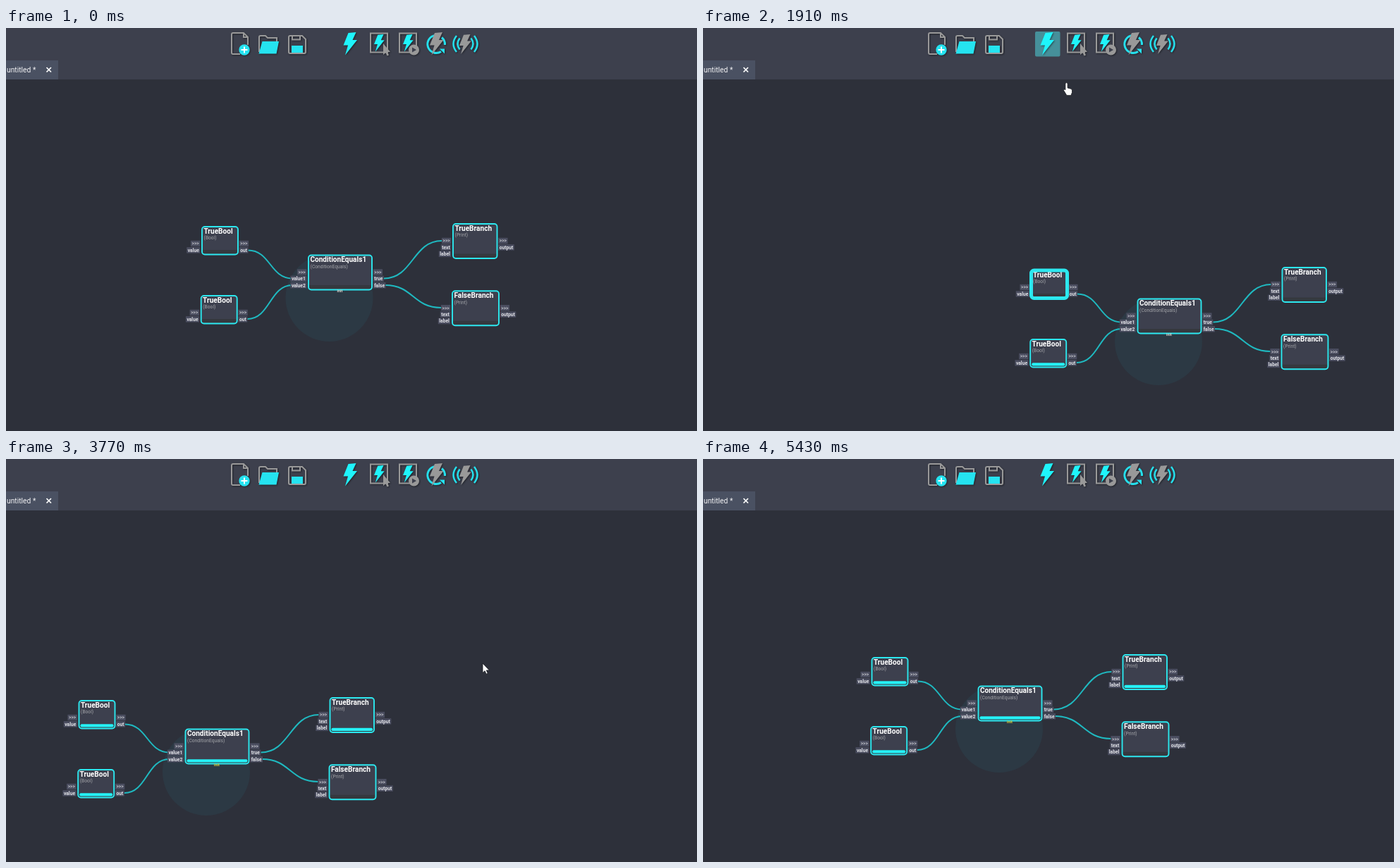
Animation of 980 by 572 pixels, one loop 6090 ms. Source, as an HTML page:

```html
<!DOCTYPE html>
<html lang="en">
<head>
<meta charset="utf-8">
<title>Node graph run</title>
<style>
html, body { margin: 0; width: 100%; height: 100%; overflow: hidden; background: #2d303a; }
svg { display: block; width: 100vw; height: 100vh; font-family: Roboto, sans-serif; }
.icons { filter: drop-shadow(1px 1px 1px #0007); fill: none; stroke-width: 2; }
.grey { stroke: #999; }
.cyan { stroke: #25dfec; }
.grey-fill { fill: #999; }
.cyan-fill { fill: #25e3f0; }
.title { font-weight: 700; font-size: 10.1px; fill: #fff; }
.type { font-size: 6.7px; fill: #a2a3a8; }
.port { font-weight: 700; font-size: 6.7px; fill: #e2e3e8; }
.wire { fill: none; stroke: #1fb9c0; stroke-width: 2; }
</style>
</head>
<body>
<svg viewBox="0 0 980 572">
  <g id="graph">
    <circle cx="458.5" cy="383" r="62" fill="#2c3944"/>
  </g>

  <rect width="980" height="73" fill="#3d404d"/>
  <rect y="46" width="74" height="27" fill="#4a5162"/>
  <text x="1" y="63" font-size="10.3" fill="#f2f2f4">untitled *</text>
  <path d="M57.5 56l6.5 6.5m0-6.5l-6.5 6.5" stroke="#fff" stroke-width="1.7"/>
  <rect id="highlight" x="471" y="5" width="35.5" height="35.5" rx="2" fill="#46909a"/>

  <defs>
    <path id="bolt" stroke="none" d="M7 1L18 0L13 11H19.500L2.500 32.500L6.500 18.500H0Z"/>
  </defs>
  <g class="icons">
    <path class="grey" d="M332 37H322q-2 0-2-2V9q0-2 2-2h15l6 6v11M337 7v6h6"/>
    <circle class="cyan-fill" cx="338" cy="31" r="7.7"/>
    <path d="M333.5 31h9m-4.500-4.500v9" stroke="#fff"/>

    <path class="grey" d="M359 34V13q0-2 2-2h7l3 3h13v5"/>
    <path class="cyan-fill" d="M363.500 19H387L383.500 36.500H358.500Z"/>

    <path class="grey" d="M403 11h17l5 5v18q0 2-2 2h-20q-2 0-2-2v-21q0-2 2-2z"/>
    <path class="grey" d="M406 11v5.500h11V11"/>
    <path class="cyan-fill" d="M405 25h16v10h-16z"/>

    <use href="#bolt" x="478.500" y="6" fill="#1ff4fb"/>

    <path class="grey" d="M517 7.500h24v27h-24z"/>
    <use href="#bolt" transform="translate(522 9) scale(.75)" fill="#1ff4fb"/>
    <path class="grey-fill" d="M535 22v16l3.500-3 2 4.500 2.500-1-2-4.500h4z"/>

    <path class="grey" d="M558 7.500h24v27h-24z"/>
    <use href="#bolt" transform="translate(563 9) scale(.75)" fill="#1ff4fb"/>
    <circle class="grey-fill" cx="578.500" cy="31" r="7.500"/>
    <path d="M576 27.500l6 3.500-6 3.500z" fill="#3d404d"/>

    <path class="cyan" stroke-width="3" d="M617 33.500A12.500 12.500 0 1 1 609 10.500M618 13.500A12.500 12.500 0 0 1 622.500 24"/>
    <path class="cyan-fill" d="M615 29.500h7v7z"/>
    <use href="#bolt" x="601" y="6" fill="#999"/>

    <use href="#bolt" transform="translate(643 9) scale(.86)" fill="#999"/>
    <path class="cyan" stroke-width="2.500" d="M643.500 14.500q-6 8 0 16M639 11q-9 11.500 0 23M659.500 14.500q6 8 0 16M664 11q9 11.500 0 23"/>
  </g>

  <g id="cursor">
    <circle id="press" r="12" fill="#a19a2b"/>
    <path id="arrow" fill="#fff" stroke="#15171c" stroke-width=".8" d="M0 0v13.500l3.100-2.800 2 4.500 2.200-1-2-4.300h4.200z"/>
    <path id="pointer" fill="#fff" stroke="#15171c" stroke-width=".8" d="M-1.600 1.200a1.600 1.600 0 0 1 3.200 0v5.800l4.600 1.300q1.800.5 1.800 2.400v2.700l-1.600 4.300h-6l-4.400-7.200q0-2 1.600-1.500l.8.8z"/>
    <g id="grab" fill="none" stroke="#fffbd0" stroke-linecap="round" stroke-width="1.800">
      <path d="M-2.500 2v-5M0 2v-6M2.400 2v-5M4.600 3v-4M-5 1.500l3 3"/>
      <path fill="#fffbd0" d="M-2.500 2h7v2l-1.500 3h-3z"/>
    </g>
  </g>
</svg>
<script>
const LOOP = 6090, STEP = 66.35, FIRST_STEP = 112;
const graph = document.getElementById('graph');

function add(parent, tag, attrs, text) {
  const el = document.createElementNS('http://www.w3.org/2000/svg', tag);
  for (const key in attrs) el.setAttribute(key, attrs[key]);
  if (text) el.textContent = text;
  parent.append(el);
  return el;
}

const wires = [
  [343.5, 315.5, 406, 355.5], [342.5, 413, 406, 365],
  [536, 355.5, 618, 302], [538, 365, 617, 397]
];
for (const [x1, y1, x2, y2] of wires) {
  const mid = (x1 + x2) / 2;
  add(graph, 'path', { class: 'wire', d: `M${x1} ${y1}C${mid} ${y1} ${mid} ${y2} ${x2} ${y2}` });
}

// start and done are the steps at which a node begins and finishes running
const nodes = [
  { title: 'TrueBool', type: 'Bool', box: [277, 281, 53, 41.5], ins: ['value'], outs: ['out'], start: 24, done: 32 },
  { title: 'TrueBool', type: 'Bool', box: [275.7, 379, 53, 41.5], ins: ['value'], outs: ['out'], start: 17, done: 24 },
  { title: 'ConditionEquals1', type: 'ConditionEquals', box: [428, 321.5, 92, 51], ins: ['value1', 'value2'], outs: ['true', 'false'], start: 32, done: 41 },
  { title: 'TrueBranch', type: 'Print', box: [633, 277, 64.5, 51], ins: ['text', 'label'], outs: ['output'], start: 41, done: 44 },
  { title: 'FalseBranch', type: 'Print', box: [632, 372.2, 68, 51], ins: ['text', 'label'], outs: ['output'], start: Infinity, done: Infinity }
];

function addPort(name, x, y, anchor) {
  const back = add(graph, 'rect', { y: y - 4.2, height: 8.4, fill: '#4a4d5f' });
  const label = add(graph, 'text', { class: 'port', x, y: y + 2.3, 'text-anchor': anchor }, name);
  if (name === '>>>') label.style.fill = '#b9bac2';
  const width = label.getComputedTextLength();
  back.setAttribute('x', (anchor === 'end' ? x - width : x) - 1.5);
  back.setAttribute('width', width + 3);
}

for (const node of nodes) {
  const [x, y, w, h] = node.box;
  add(graph, 'rect', { x: x + 1, y: y + 1, width: w - 2, height: h - 2, rx: 4, fill: '#3d404e' });
  add(graph, 'rect', { x: x + 2, y: y + h - 7.5, width: w - 4, height: 5.5, fill: '#35383e' });
  node.bar = add(graph, 'rect', { x: x + 3, y: y + h - 7.2, width: w - 6, height: 4.2, rx: 1.8, fill: '#25f2f8' });
  add(graph, 'text', { class: 'title', x: x + 3.4, y: y + 10.6 }, node.title);
  add(graph, 'text', { class: 'type', x: x + 3.6, y: y + 19.4 }, `(${node.type})`);
  ['>>>', ...node.ins].forEach((name, i) => addPort(name, x - 3.2, y + 25 + i * 9.4, 'end'));
  ['>>>', ...node.outs].forEach((name, i) => addPort(name, x + w + 2.2, y + 25 + i * 9.4, 'start'));
  node.border = add(graph, 'rect', { x: x + 1, y: y + 1, width: w - 2, height: h - 2, rx: 4, fill: 'none', stroke: '#2ce8ef' });
}
const hint = add(graph, 'text', { x: 473.5, y: 375, 'font-size': 5.5, 'font-weight': 700, 'text-anchor': 'middle' }, 'init');

// keys: [step, x, y]
const cursorKeys = [
  [0, 921, 556], [3, 690, 270], [7, 490, 24], [12, 490, 24], [18, 512.5, 72], [19, 515.5, 78],
  [49, 515.5, 78], [55, 676, 290], [59, 522, 337], [64, 408, 391],
  [68, 459, 378.5], [69, 480.5, 358], [73, 544, 330], [75, 544, 330],
  [76, 566, 345], [79, 930, 480], [80, 1010, 520]
];
const cameraKeys = [
  [17, 0, 0], [19, 189, -35], [23, 189, -35], [27, 187.5, 62],
  [31, 187.5, 62], [34, 17.3, 17], [40, 17.3, 17], [44, -174.5, 61]
];
const linear = u => u;
const smooth = u => u * u * (3 - 2 * u);

function track(keys, step, ease) {
  const next = keys.findIndex(key => key[0] > step);
  if (next === 0) return keys[0].slice(1);
  if (next < 0) return keys[keys.length - 1].slice(1);
  const [s0, x0, y0] = keys[next - 1], [s1, x1, y1] = keys[next];
  const u = ease((step - s0) / (s1 - s0));
  return [x0 + (x1 - x0) * u, y0 + (y1 - y0) * u];
}

function show(id, visible) {
  document.getElementById(id).style.display = visible ? '' : 'none';
}
function move(el, [x, y]) {
  el.setAttribute('transform', `translate(${x} ${y})`);
}
const within = (step, from, to) => step >= from && step < to;

function draw() {
  const step = Math.floor((performance.now() % LOOP - FIRST_STEP) / STEP);
  const pos = track(cursorKeys, step, linear);
  const camera = track(cameraKeys, step, smooth);
  if (step > 64) {
    const drag = track(cursorKeys, Math.min(step, 73), linear);
    camera[0] += drag[0] - 408;
    camera[1] += drag[1] - 391;
  }
  move(graph, camera);
  move(document.getElementById('cursor'), pos);

  const pointing = within(step, 6, 44), dragging = within(step, 64, 76);
  show('cursor', within(step, 0, 80));
  show('highlight', pointing);
  show('pointer', pointing);
  show('grab', dragging);
  show('arrow', !pointing && !dragging);
  show('press', dragging || within(step, 9, 11));

  for (const { start, done, bar, border } of nodes) {
    bar.style.display = step >= done ? '' : 'none';
    border.setAttribute('stroke-width', within(step, start, done) ? 5 : 1.9);
  }
  hint.setAttribute('fill', step >= 32 ? '#d9cf3c' : '#d8d4cc');
  requestAnimationFrame(draw);
}
draw();
</script>
</body>
</html>
```
